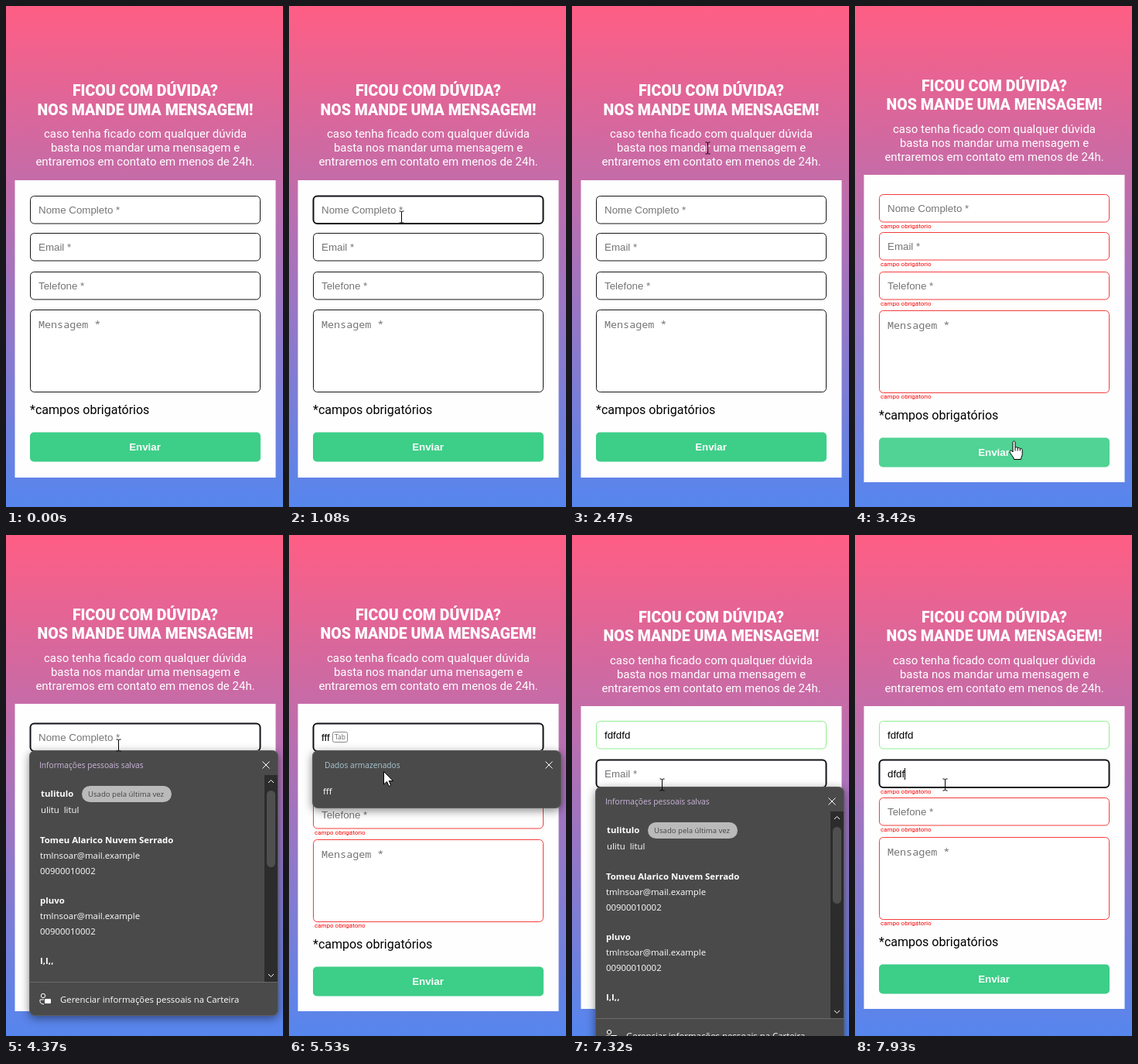
These frames come from a looping animation (358x647 px, 8 s). An HTML page:

```html
<!DOCTYPE html>
<html lang="pt-BR">
<head>
<meta charset="utf-8">
<title>Formulário de contato</title>
<style>
  html, body { margin: 0; width: 100%; height: 100%; overflow: hidden; }
  svg { display: block; width: 358px; height: 647px; background: linear-gradient(#ff5e84, #5586ee); }
  text { white-space: pre; }
  .title { font: 900 19.5px Roboto, sans-serif; fill: #fff; text-anchor: middle; }
  .lead { font: 15px Roboto, sans-serif; fill: #fff; text-anchor: middle; }
  .input { font: 13.333px "Liberation Sans", Arial, sans-serif; fill: #000; }
  .hint { fill: #757575; }
  .mono { font: 13.4px "Noto Sans Mono", monospace; }
  .error { font: 8px Roboto, sans-serif; fill: #f00; }
  .note { font: 16px Roboto, sans-serif; fill: #000; }
  .send { font: bold 13.333px "Liberation Sans", Arial, sans-serif; fill: #fff; text-anchor: middle; }
  .ui { font: 500 11.4px "Open Sans", sans-serif; fill: #fff; }
  .bold { font-weight: 700; }
  .heading { font-size: 10.2px; font-weight: 400; }
  .popup { filter: drop-shadow(0 3px 6px #0007); }
  .line { fill: none; stroke: #fff; stroke-width: 1; }
</style>
</head>
<body>
<svg viewBox="0 0 358 647">
  <g id="page"></g>
  <rect id="caret" width="1" height="15"/>
  <g id="pointer"></g>
</svg>
<script>
const DURATION = 8000;

const LAYOUTS = {
  idle:    { titles: [116, 141], lead: 170, card: [225, 384], fields: [245.5, 293.5, 343.5, 392.5], note: 527, button: 550.5 },
  invalid: { titles: [110, 134], lead: 164, card: [218, 397], fields: [243.5, 292.5, 343.5, 393.5], note: 534, button: 557.5 },
  partial: { titles: [113, 137], lead: 167, card: [221, 391], fields: [240.5, 290.5, 339.5, 390.5], note: 531, button: 554.5 },
};
const HINTS = ['Nome Completo *', 'Email *', 'Telefone *', 'Mensagem *'];
const LEAD = ['caso tenha ficado com qualquer dúvida', 'basta nos mandar uma mensagem e', 'entraremos em contato em menos de 24h.'];
const SAVED_NAME = 'tulitulo';

// Each entry overrides the previous state from its time on.
const EVENTS = [
  [0, { layout: 'idle', focus: -1, popup: '', values: ['', ''], tab: false }],
  [1080, { focus: 0 }],
  [1210, { popup: 'saved' }],
  [2270, { focus: -1, popup: '' }],
  [3290, { layout: 'invalid' }],
  [4170, { focus: 0 }],
  [4300, { popup: 'saved' }],
  [5460, { values: ['f', ''] }],
  [5530, { values: ['fff', ''], popup: 'stored', tab: true }],
  [5660, { values: ['fd', ''], popup: '', tab: false }],
  [5790, { values: ['fdf', ''] }],
  [5920, { values: ['fdfd', ''] }],
  [6050, { values: ['fdfdf', ''] }],
  [6180, { values: ['fdfdfd', ''] }],
  [6700, { layout: 'partial', focus: -1 }],
  [7060, { focus: 1 }],
  [7190, { popup: 'saved' }],
  [7390, { values: ['fdfdfd', 'd'], popup: '' }],
  [7520, { values: ['fdfdfd', 'df'] }],
  [7650, { values: ['fdfdfd', 'dfd'] }],
  [7850, { values: ['fdfdfd', 'dfdf'] }],
];

// Pointer stops: time, x, y.
const PATH = [
  [0, 215, 670], [190, 215, 650], [940, 145, 274], [1140, 145, 272], [1720, 133, 325],
  [1850, 134, 326], [2330, 174, 170], [2470, 175, 183], [2600, 176, 184], [3200, 205, 562],
  [3420, 205, 562], [3970, 145, 274], [4170, 145, 271], [4440, 145, 271], [4510, 145, 265],
  [4640, 145, 265], [5460, 122, 305], [6400, 122, 305], [6680, 142, 284], [6800, 142, 284],
  [7060, 117, 318], [7320, 116, 322], [DURATION, 116, 322],
];

const POINTERS = {
  arrow: '<path d="M0 0V16.5L4 13L6.6 19L9.2 17.9L6.7 12.1H12Z" fill="#fff" stroke="#000"/>',
  beam: '<path d="M-3 -7.5H-1L0 -6.5L1 -7.5H3M0 -6.5V6.5M-3 7.5H-1L0 6.5L1 7.5H3" fill="none" stroke="#000"/>',
  hand: '<path d="M-1.5 1C-1.5 -1 1.5 -1 1.5 1V8C2.5 6.5 4.5 7 4.7 8.5C6 7.3 7.6 8 7.8 9.5C9 8.6 10.7 9.3 10.7 11V16C10.7 19 9 20 9 23H0C0 20 -5.5 15.5 -5.5 13C-5.5 11 -3 11.2 -1.5 13.5Z" fill="#fff" stroke="#000"/><path d="M1.5 8V12M4.7 8.5V12M7.8 9.5V12" stroke="#000"/>',
};

const text = (cls, x, y, content) => `<text class="${cls}" x="${x}" y="${y}">${content}</text>`;
const box = (x, y, w, h, fill, r = 0, extra = '') =>
  `<rect x="${x}" y="${y}" width="${w}" height="${h}" rx="${r}" fill="${fill}" ${extra}/>`;
const line = d => `<path class="line" d="${d}"/>`;

function stateAt(t) {
  return Object.assign({}, ...EVENTS.filter(([start]) => start <= t).map(([, change]) => change));
}

function pointerAt(t) {
  const i = PATH.findIndex(([end]) => end > t);
  const [t0, x0, y0] = PATH[i - 1], [t1, x1, y1] = PATH[i];
  const k = (t - t0) / (t1 - t0), eased = k * k * (3 - 2 * k);
  return [x0 + (x1 - x0) * eased, y0 + (y1 - y0) * eased];
}

const popupTop = s => Math.floor(LAYOUTS[s.layout].fields[s.focus] + 35);

function hitTest(s, y) {
  const l = LAYOUTS[s.layout];
  const top = popupTop(s), height = s.popup === 'saved' ? 342 : 74;
  if (s.popup && y >= top && y < top + height) {
    return s.popup === 'saved' && y > top + 37 && y < top + 96 ? 'item' : 'popup';
  }
  if (y >= l.button && y < l.button + 38) return 'button';
  if (l.fields.some((f, i) => y >= f && y < f + (i === 3 ? 106 : 36))) return 'field';
  return y > l.titles[0] - 14 && y < l.lead + 40 ? 'text' : 'blank';
}

function drawField(s, i, y, hit) {
  const focused = s.focus === i, checked = s.layout !== 'idle';
  const valid = s.layout === 'partial' && i === 0;
  const preview = focused && hit === 'item';
  const color = focused ? '#101218' : valid ? '#90ee90' : checked ? '#f43c3c' : '#151515';
  const value = s.values[i] || '', baseline = y + (i === 3 ? 23.5 : 22.5);
  let out = box(31.5, y, 297, i === 3 ? 106 : 35.5, preview ? '#e8f0fe' : '#fff', 5,
    `stroke="${color}" stroke-width="${focused ? 2 : 1}"`);
  if (preview) out += `<text class="ui" style="font-size:13.333px;fill:#222" x="42" y="${baseline}">${SAVED_NAME}</text>`;
  else if (value) out += text('input value' + i, 42, baseline, value);
  else out += text('input hint' + (i === 3 ? ' mono' : ''), 42, baseline, HINTS[i]);
  if (focused && s.tab) {
    out += box(56.5, y + 11, 19, 13, '#fff', 2, 'stroke="#888"');
    out += `<text class="ui" style="font-size:8.5px;fill:#666" x="59" y="${y + 20.5}">Tab</text>`;
  }
  if (checked && !valid) out += text('error', 33, y + (i === 3 ? 113.5 : 43.5), 'campo obrigátorio');
  return out;
}

function drawContact(y, name) {
  return text('ui bold', 44, y, name) + text('ui', 44, y + 20, 'tmlnsoar@mail.example') + text('ui', 44, y + 40, '00900010002');
}

function drawPopup(s, hit) {
  const saved = s.popup === 'saved', height = saved ? 342 : 74;
  let out = box(30.5, 0.5, 321, height, '#4a4a4a', 7, 'class="popup" stroke="#5c5c5c"');
  out += line('M331.5 14.5L340.5 23.5M340.5 14.5L331.5 23.5');
  if (!saved) {
    out += `<text class="ui heading" style="fill:#a9c7d2" x="46" y="23">Dados armazenados</text>`;
    out += text('ui', 44, 57, 'fff');
  } else {
    out += `<text class="ui heading" style="fill:#cdb7dc" x="43" y="23">Informações pessoais salvas</text>`;
    if (hit === 'item') out += box(36, 37, 293, 59, '#757575', 2);
    out += text('ui bold', 45, 60, SAVED_NAME) + text('ui', 45, 81, 'ulitu  litul');
    out += box(98, 46, 116, 21, '#bababa', 10.5);
    out += `<text class="ui" style="font-size:9.6px;fill:#444" x="106" y="60">Usado pela última vez</text>`;
    out += drawContact(120, 'Tomeu Alarico Nuvem Serrado') + drawContact(198, 'pluvo');
    out += text('ui bold', 44, 276, 'I,I,,');
    out += box(334, 32, 17, 267, '#2c2c2c') + box(337, 52, 11, 99, '#4f4f4f', 5.5);
    out += line('M339 42L342.5 38.5L346 42M339 289L342.5 292.5L346 289');
    out += box(31, 299, 320, 1, '#696969');
    out += '<circle cx="48" cy="317" r="2.7" class="line"/>' + line('M49 322H44V325Q45 328 49 328');
    out += box(50, 321, 8, 6, '#fff', 1) + text('ui', 70, 326, 'Gerenciar informações pessoais na Carteira');
  }
  return `<g transform="translate(0 ${popupTop(s)})">${out}</g>`;
}

function drawPage(s, hit) {
  const l = LAYOUTS[s.layout];
  return text('title', 180, l.titles[0], 'FICOU COM DÚVIDA?')
    + text('title', 180, l.titles[1], 'NOS MANDE UMA MENSAGEM!')
    + LEAD.map((row, i) => text('lead', 180, l.lead + i * 18, row)).join('')
    + box(11.5, l.card[0], 337, l.card[1], '#fefefe')
    + l.fields.map((y, i) => drawField(s, i, y, hit)).join('')
    + text('note', 31, l.note, '*campos obrigatórios')
    + box(31, l.button, 298, 38, hit === 'button' ? '#50d394' : '#3dce88', 5)
    + text('send', 179.5, l.button + 23.5, 'Enviar')
    + (s.popup ? drawPopup(s, hit) : '');
}

const page = document.getElementById('page');
const caret = document.getElementById('caret');
const pointer = document.getElementById('pointer');
let pageKey, pointerKind;

function render(t) {
  const s = stateAt(t), [x, y] = pointerAt(t), hit = hitTest(s, y);
  const key = JSON.stringify(s) + hit;
  if (key !== pageKey) {
    page.innerHTML = drawPage(s, hit);
    pageKey = key;
  }
  const showCaret = s.focus >= 0 && t % 1000 >= 600;
  caret.style.display = showCaret ? '' : 'none';
  if (showCaret) {
    const value = page.querySelector('.value' + s.focus);
    caret.setAttribute('x', 42 + Math.round(value ? value.getComputedTextLength() : 0));
    caret.setAttribute('y', LAYOUTS[s.layout].fields[s.focus] + 10.5);
  }
  const kind = hit === 'button' ? 'hand' : hit === 'field' || hit === 'text' ? 'beam' : 'arrow';
  if (kind !== pointerKind) {
    pointer.innerHTML = POINTERS[kind];
    pointerKind = kind;
  }
  pointer.setAttribute('transform', `translate(${Math.round(x) + 0.5} ${Math.round(y) + 0.5})`);
}

const start = performance.now();
function tick() {
  render((performance.now() - start) % DURATION);
  requestAnimationFrame(tick);
}
tick();
</script>
</body>
</html>
```
